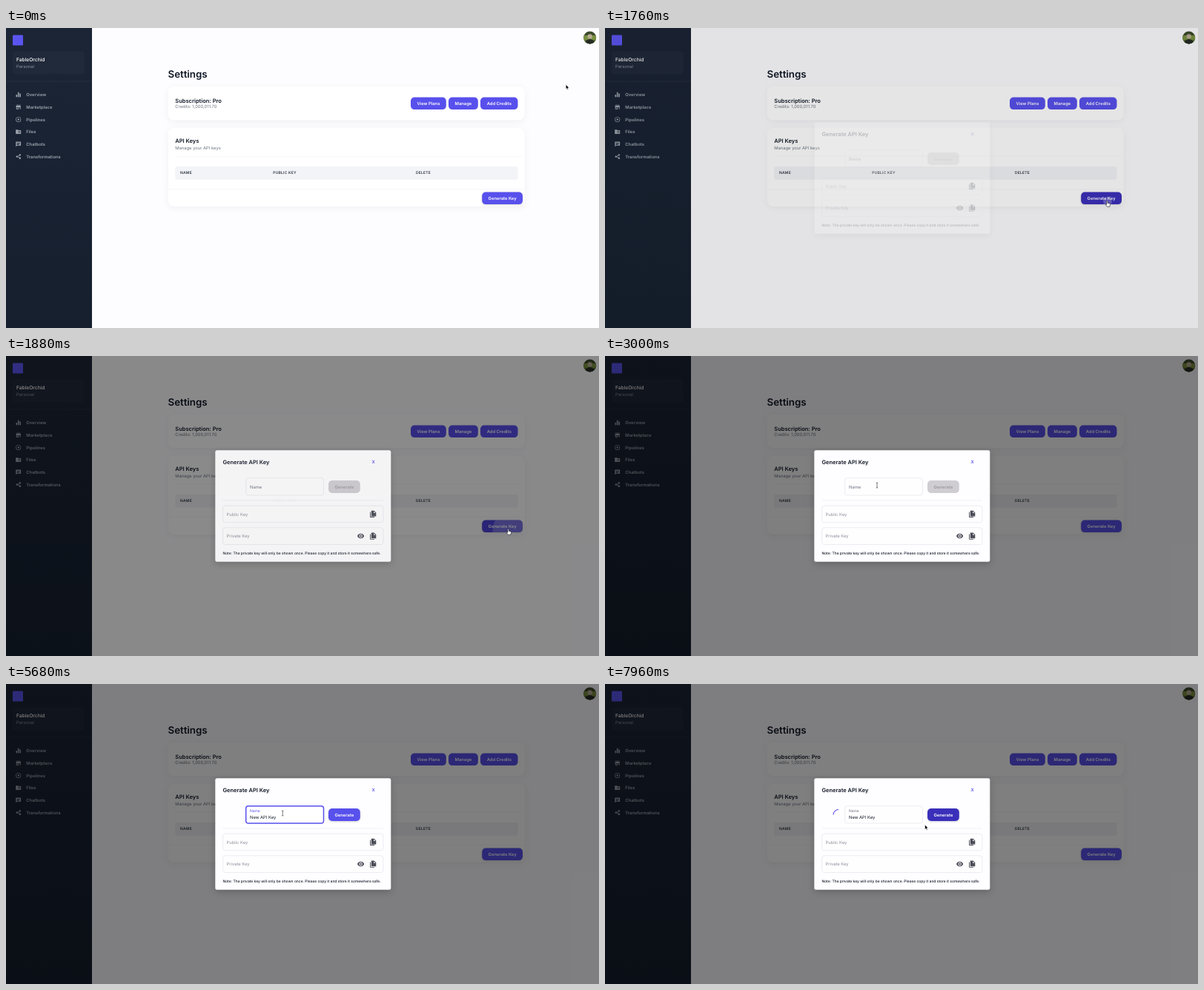
Animation, 800 px wide and 405 px high, one loop 8 s. Source, as an HTML page:

```html
<!DOCTYPE html>
<html lang="en">
<head>
<meta charset="utf-8">
<title>Settings</title>
<style>
html, body { margin: 0; width: 100%; height: 100%; overflow: hidden; background: #fdfcff; }
svg { display: block; width: 100vw; height: 100vh; }
text { font: 5.83px Inter, sans-serif; fill: #111927; text-rendering: geometricPrecision; white-space: pre; }
.h4 { font-size: 13.33px; font-weight: 600; }
.h6 { font-size: 7.5px; font-weight: 600; }
.muted { fill: #6c737f; }
.nav text { font-weight: 600; fill: #9da4ae; }
.nav path { fill: #9da4ae; }
.th { font-size: 5px; font-weight: 600; letter-spacing: .2px; fill: #2f3746; }
.btn { font-weight: 600; fill: #fff; text-anchor: middle; }
.card { fill: #fff; stroke: #000; stroke-opacity: .025; stroke-width: .5; filter: drop-shadow(0 2px 4px rgba(0,0,0,.05)); }
.field { fill: #fff; fill-opacity: .4; stroke: #dfe1e6; stroke-width: .6; }
.hint { fill: #8b9099; }
.icon { fill: #4b4e57; }
.line { stroke: #f0f0f4; stroke-width: .5; }
</style>
</head>
<body>
<svg viewBox="0 0 800 405" preserveAspectRatio="none">
  <defs>
    <linearGradient id="side" x2="0" y2="1"><stop stop-color="#1c2536"/><stop offset="1" stop-color="#151f2e"/></linearGradient>
    <clipPath id="face"><circle cx="787.7" cy="13" r="8.5"/></clipPath>
    <clipPath id="keyClip"><rect x="642.2" y="221.5" width="54.8" height="16.6" rx="5"/></clipPath>
    <clipPath id="genClip"><rect x="435" y="168" width="42.8" height="17" rx="5"/></clipPath>
  </defs>

  <rect width="800" height="405" fill="#fdfcff"/>
  <rect width="116" height="405" fill="url(#side)"/>
  <rect x="9" y="9.6" width="14" height="14" rx="1" fill="#5b55f0"/>
  <rect x="9" y="32" width="96.5" height="30" rx="3.5" fill="#fff" fill-opacity=".025" stroke="#fff" stroke-opacity=".025" stroke-width=".5"/>
  <text x="14" y="45.3" style="font-size:6.67px;font-weight:500;fill:#fff">FableOrchid</text>
  <text x="14" y="54.4" style="fill:#8d95a2">Personal</text>
  <path d="M0 72H116" stroke="#2f3949" stroke-width=".5"/>
  <g id="nav" class="nav"></g>

  <g clip-path="url(#face)">
    <rect x="779" y="4" width="18" height="18" fill="#3c4a2b"/>
    <rect x="779" y="10" width="18" height="6" fill="#78903f"/>
    <rect x="779" y="16" width="18" height="6" fill="#53672f"/>
    <circle cx="787.7" cy="11.4" r="3.2" fill="#b7aa94"/>
    <path d="M781 22Q782 15 787.7 15T794.5 22Z" fill="#252d24"/>
  </g>

  <text class="h4" x="218.5" y="66.5">Settings</text>
  <rect class="card" x="218.5" y="78.5" width="481.5" height="46" rx="8"/>
  <text class="h6" x="228.3" y="100.6">Subscription: Pro</text>
  <text class="muted" x="228.3" y="108.4">Credits: 1,000,011.70</text>
  <g id="plans"></g>

  <rect class="card" x="218.5" y="134.5" width="481.5" height="106.5" rx="8"/>
  <text class="h6" x="228.3" y="155.4">API Keys</text>
  <text class="muted" x="228.3" y="163.7">Manage your API keys</text>
  <path class="line" d="M228 173.2H697M219 217.7H700"/>
  <rect x="228.2" y="187" width="462.3" height="17.8" rx="2" fill="#f3f4f7"/>
  <text class="th" x="235" y="197.2">NAME</text>
  <text class="th" x="360.3" y="197.2">PUBLIC KEY</text>
  <text class="th" x="553" y="197.2">DELETE</text>
  <rect id="key" x="642.2" y="221.5" width="54.8" height="16.6" rx="5" style="filter:drop-shadow(0 1px 1.5px rgba(0,0,0,.16))"/>
  <g clip-path="url(#keyClip)"><circle id="keyWave" cx="678" cy="234" fill="#fff"/></g>
  <text class="btn" x="669.6" y="231.9">Generate Key</text>

  <rect id="dim" width="800" height="405"/>

  <g id="modal">
    <rect x="282.3" y="127.2" width="237" height="150.6" rx="2.5" fill="#fefdff" style="filter:drop-shadow(0 3px 5px rgba(0,0,0,.2))"/>
    <text class="h6" x="292.4" y="145.6">Generate API Key</text>
    <text x="493.5" y="144.7" style="font-weight:600;fill:#5850ec">X</text>
    <path id="spin" d="M308 176.5A7 7 0 0 1 315 169.5" fill="none" stroke="#5850ec" stroke-width="1"/>
    <rect id="field" class="field" x="323.7" y="164.8" width="104.8" height="23.2" rx="3.3"/>
    <text id="label">Name</text>
    <text id="value" x="329" y="182.1"></text>
    <rect id="gen" x="435" y="168" width="42.8" height="17" rx="5"/>
    <g clip-path="url(#genClip)"><circle id="genWave" cx="442" cy="175" fill="#fff"/></g>
    <text id="genText" class="btn" x="456.4" y="178.6">Generate</text>
    <path class="line" d="M292.5 195H509" style="stroke:#e6e6ea"/>
    <rect class="field" x="292.7" y="202.2" width="216.2" height="22.5" rx="3.3"/>
    <text class="hint" x="297.5" y="215.5">Public Key</text>
    <rect class="field" x="292.7" y="231.8" width="216.2" height="22.7" rx="3.3"/>
    <text class="hint" x="297.5" y="245.2">Private Key</text>
    <g id="copies"></g>
    <path class="icon" fill-rule="evenodd" d="M474 243Q475.3 239.8 478.6 239.8T483.2 243Q481.9 246.2 478.6 246.2T474 243ZM476.4 243a2.2 2.2 0 1 0 4.4 0a2.2 2.2 0 1 0-4.4 0ZM477.3 243a1.3 1.3 0 1 1 2.6 0a1.3 1.3 0 1 1-2.6 0Z"/>
    <text x="292.4" y="267.6" style="font-size:4.94px;font-weight:500">Note: The private key will only be shown once. Please copy it and store it somewhere safe.</text>
  </g>

  <g id="cursor" stroke-linejoin="round">
    <path id="arrow" d="M0 0V6.2L1.4 5L2.4 7.2L3.4 6.8L2.5 4.6H4.3Z" fill="#000" stroke="#fff" stroke-width=".5"/>
    <path id="hand" d="M-.7 .6Q0-.4 .7 .6V3L3.2 3.7Q4.1 4 3.9 5L3.3 8H-.4L-2.3 5.4Q-2.4 4.3-1.4 4.7L-.7 5.3Z" fill="#fff" stroke="#15151c" stroke-width=".6"/>
    <path id="beam" d="M-1.2-3.6Q0-3.6 0-2.8Q0-3.6 1.2-3.6M0-2.8V2.8M-1.2 3.6Q0 3.6 0 2.8Q0 3.6 1.2 3.6" fill="none" stroke="#222" stroke-width=".6"/>
  </g>
</svg>

<script>
const $ = id => document.getElementById(id);
const set = (id, attrs) => { for (const k in attrs) $(id).setAttribute(k, attrs[k]); };
const clamp = x => Math.min(1, Math.max(0, x));
const ease = (t, from, to) => { const x = clamp((t - from) / (to - from)); return x * x * (3 - 2 * x); };
const lerp = (a, b, k) => a + (b - a) * k;
const MAIN = [88, 80, 236], DARK = [58, 47, 186];
const mix = k => `rgb(${MAIN.map((c, i) => Math.round(lerp(c, DARK[i], k)))})`;

// Icons are drawn around the origin, about 7 units wide.
const nav = [
  ["Overview", "M-3.2 0h1.6v3.2h-1.6ZM-.8-3.3h1.6v6.5h-1.6ZM1.6-1.4h1.6v4.6h-1.6Z"],
  ["Marketplace", "M-2.9-3h5.8v.8h-5.8ZM-2.9-1.8h5.8l.5 1.9h-.5V3H2V.2H.5V3h-3.4V.1h-.5ZM-2 .4V2h1.7V.4Z"],
  ["Pipelines", "M-3.5 0a3.5 3.5 0 1 0 7 0a3.5 3.5 0 1 0-7 0ZM-2.8 0a2.8 2.8 0 1 1 5.6 0a2.8 2.8 0 1 1-5.6 0ZM-.9-1.6L1.6 0L-.9 1.6Z"],
  ["Files", "M-3.5-2.8h2.8l.7.8h3.5v4.8h-7ZM-.2-.8v.7h2.7v-.7ZM-.2.7v.7h2.7v-.7Z"],
  ["Chatbots", "M-3.4-3.3h6.8v5.2h-5.2l-1.6 1.6ZM-2-2v.7h4V-2ZM-2-.8v.7h4v-.7ZM-2 .4v.7h2.7V.4Z"],
  ["Transformations", "M-3.2 0a1.2 1.2 0 0 1 2.2-.6L1-1.9a1.2 1.2 0 1 1 .4.7L-.7 0L1.4 1.3a1.2 1.2 0 1 1-.4.7L-1 .7A1.2 1.2 0 0 1-3.2 0Z"]
];
$("nav").innerHTML = nav.map(([name, d], i) => {
  const y = 90 + i * 16.7;
  return `<path fill-rule="evenodd" transform="translate(16.7 ${y})" d="${d}"/><text x="27.3" y="${y + 2.1}">${name}</text>`;
}).join("");

$("plans").innerHTML = [[546, 47.8, "View Plans"], [597, 39.8, "Manage"], [640, 50.5, "Add Credits"]].map(([x, w, name]) =>
  `<rect x="${x}" y="93.5" width="${w}" height="16.6" rx="5" fill="${mix(0)}"/><text class="btn" x="${x + w / 2}" y="103.9">${name}</text>`).join("");

$("copies").innerHTML = [213.4, 243.2].map(y =>
  `<path class="icon" fill-rule="evenodd" transform="translate(495.2 ${y})" d="M-4.1-2.7h.9v6.4h5v.9h-5.9ZM-2.4-4.6h3.8l2.7 2.7v4.9h-6.5ZM1-3.7v2.2h2.2Z"/>`).join("");

// Pointer stops: start and end of each move, then where it leads.
const start = [755.3, 76.3];
const moves = [
  [40, 840, 677.6, 233.2],
  [2280, 2840, 367, 174.5],
  [5560, 6240, 441.5, 173.6],
  [7480, 7840, 431.6, 190]
];
// Moment at which each letter of the name appears.
const name = "New API Key";
const typed = [4000, 4120, 4240, 4360, 4400, 4480, 4560, 4680, 4760, 5240, 5400];

function pointer(t) {
  let [x, y] = start;
  for (const [a, b, tx, ty] of moves) {
    const k = ease(t, a, b);
    x = lerp(x, tx, k);
    y = lerp(y, ty, k);
  }
  return [x, y];
}

function wave(id, t, from, size) {
  set(id, { r: size * ease(t, from, from + 400), opacity: .25 * (1 - ease(t, from + 320, from + 620)) });
}

function draw(t) {
  const open = ease(t, 1695, 1920);
  set("dim", { "fill-opacity": .5 * open });
  set("modal", { opacity: open });
  set("key", { fill: mix(ease(t, 840, 1080) - ease(t, 1740, 1990)) });
  wave("keyWave", t, 1660, 37);

  const focused = t >= 3480 && t < 6880;
  const float = ease(t, 3480, 3680);
  set("field", { style: focused ? "stroke:#5850ec;stroke-width:1.5;fill-opacity:1" : "" });
  set("label", {
    transform: `translate(329 ${lerp(178.8, 173.1, float)}) scale(${lerp(1, .85, float)})`,
    style: `fill:${focused ? "#5850ec" : "#6c737f"}`
  });
  $("value").textContent = name.slice(0, typed.filter(at => t >= at).length);

  const ready = t >= typed[0];
  set("gen", {
    fill: ready ? mix(ease(t, 6180, 6400)) : "#cfcdd1",
    style: ready ? "filter:drop-shadow(0 1px 1px rgba(0,0,0,.16))" : ""
  });
  set("genText", { style: ready ? "" : "fill:#9c9a9f" });
  wave("genWave", t, 6840, 42);
  set("spin", {
    opacity: t >= 7000 ? 1 : 0,
    transform: `rotate(${(t - 7960) * .36} 315 176.5)`
  });

  const [x, y] = pointer(t);
  const inside = (l, top, r, b) => x > l && x < r && y > top && y < b;
  const kind = inside(435, 168, 478, 185) || (t < 2400 && inside(642, 221, 697, 238)) ? "hand"
    : t > 2280 && inside(324, 165, 428, 188) ? "beam" : "arrow";
  for (const id of ["arrow", "hand", "beam"]) set(id, { opacity: id === kind ? 1 : 0 });
  set("cursor", { transform: `translate(${x} ${y})`, opacity: t >= 4000 && t < 5560 ? 0 : 1 });
}

const begin = performance.now();
function frame(now) {
  draw(Math.max(0, now - begin) % 8000);
  requestAnimationFrame(frame);
}
draw(0);
requestAnimationFrame(frame);
</script>
</body>
</html>
```
